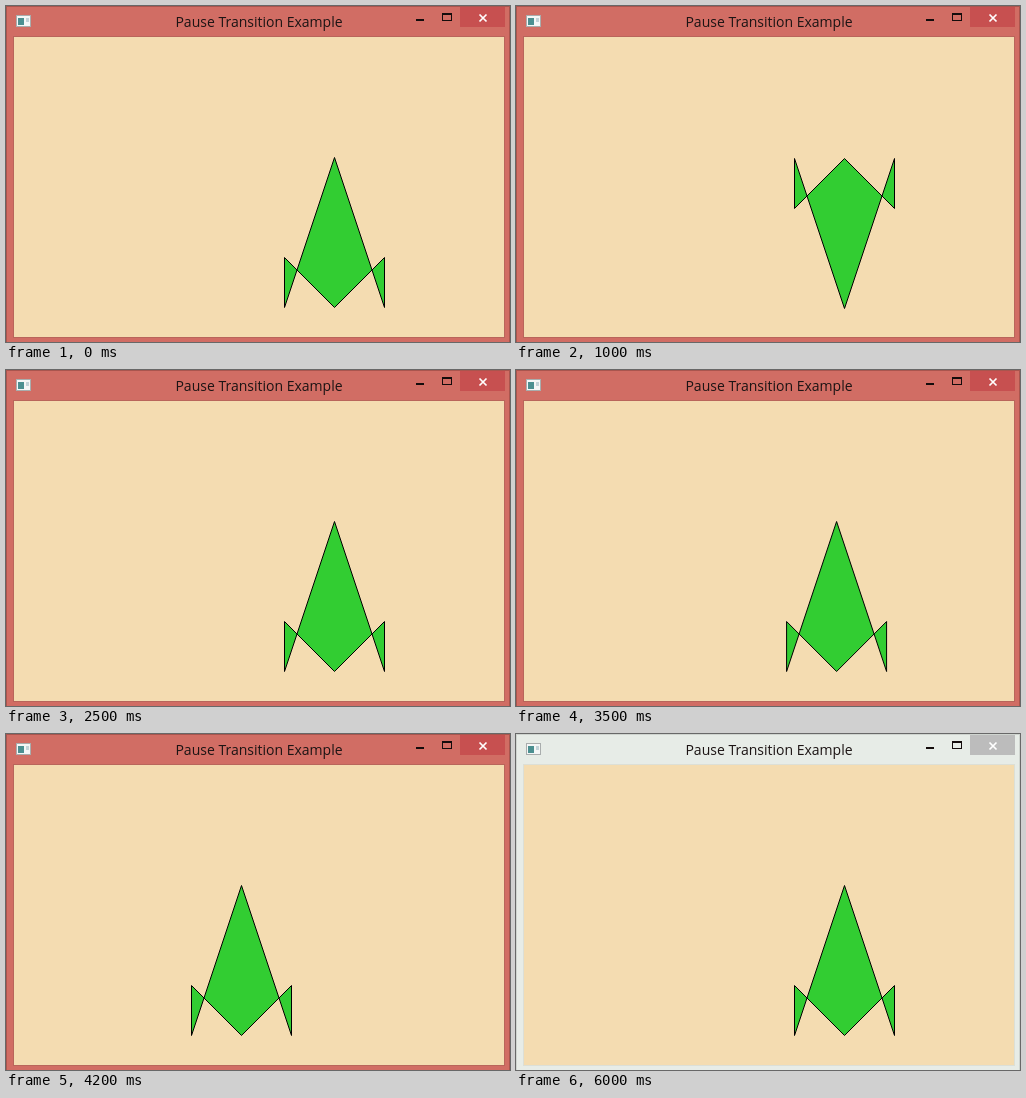
Animation of 504 by 336 pixels, one loop 6.1 s. Source, as an HTML page:

```html
<!DOCTYPE html>
<html lang="en">
<head>
<meta charset="utf-8">
<title>Pause Transition Example</title>
<style>
  html, body { margin: 0; width: 100%; height: 100%; overflow: hidden; }
  svg {
    display: block; width: 504px; height: 336px;
    --frame: #d16d64; --edge: #a9554e; --rim: #b9655b; --close: #c75050;
  }
  svg.idle { --frame: #e7ece7; --edge: #cfd4cf; --rim: #dcdfd6; --close: #bcbcbc; }
  .frame { fill: var(--frame); stroke: var(--edge); }
  .client { fill: #f4dcb1; stroke: var(--rim); }
  .close { fill: var(--close); }
  text { font: 14px "Open Sans", "Noto Sans", sans-serif; fill: #1c1414; text-anchor: middle; }
</style>
</head>
<body>
<svg id="win" viewBox="0 0 504 336">
  <rect class="frame" x=".5" y=".5" width="503" height="337"/>
  <rect class="client" x="7.5" y="30.5" width="491" height="301"/>

  <g id="icon">
    <rect x="10.5" y="9.5" width="14" height="11" fill="#f4f6f6" stroke="#a9adad"/>
    <rect x="12" y="12" width="6" height="7" fill="#4b8f90"/>
    <rect x="20" y="12" width="3" height="4" fill="#c3d3d8"/>
  </g>

  <text x="253" y="21">Pause Transition Example</text>

  <rect x="410" y="13" width="8" height="2" fill="#140c0c"/>
  <path d="M436 7h10v8h-10zM437 9v5h8v-5z" fill="#140c0c" fill-rule="evenodd"/>
  <rect class="close" x="454" y="1" width="45" height="20"/>
  <path d="M473.5 8.5l7 7m0-7l-7 7" stroke="#fff" stroke-width="1.7"/>

  <polygon id="ship" points="0,-75.5 50,74.5 50,24.5 0,74.5 -50,24.5 -50,74.5"
    fill="#32cd32" stroke="#000" stroke-miterlimit="10"/>
</svg>
<script>
const LOOP = 6100, STEP = 100, HALF = 500;
const win = document.getElementById('win');
const ship = document.getElementById('ship');

// Gentle start and stop, steady in between
function ease(t) {
  if (t < 0.2) return 3.125 * t * t;
  if (t > 0.8) return 1 - 3.125 * (1 - t) ** 2;
  return 1.25 * t - 0.125;
}

// Out and back around a peak; the pace varies slightly along the way
function swing(time, peak) {
  const d = time - peak;
  const away = d < 0 ? -0.87 * d : 1.01 * d + 0.33 * Math.max(0, d - 300);
  return ease(Math.max(0, 1 - away / HALF));
}

function draw(now) {
  const time = Math.floor((now % LOOP) / STEP) * STEP;
  const angle = 180 * swing(time, 1000);
  const x = 328.5 - 150 * swing(time, 4000);
  ship.setAttribute('transform', `translate(${x} 227) rotate(${angle})`);
  win.classList.toggle('idle', time >= 6000);
}

let start;
function tick(now) {
  start ??= now;
  draw(now - start);
  requestAnimationFrame(tick);
}
draw(0);
requestAnimationFrame(tick);
</script>
</body>
</html>
```
